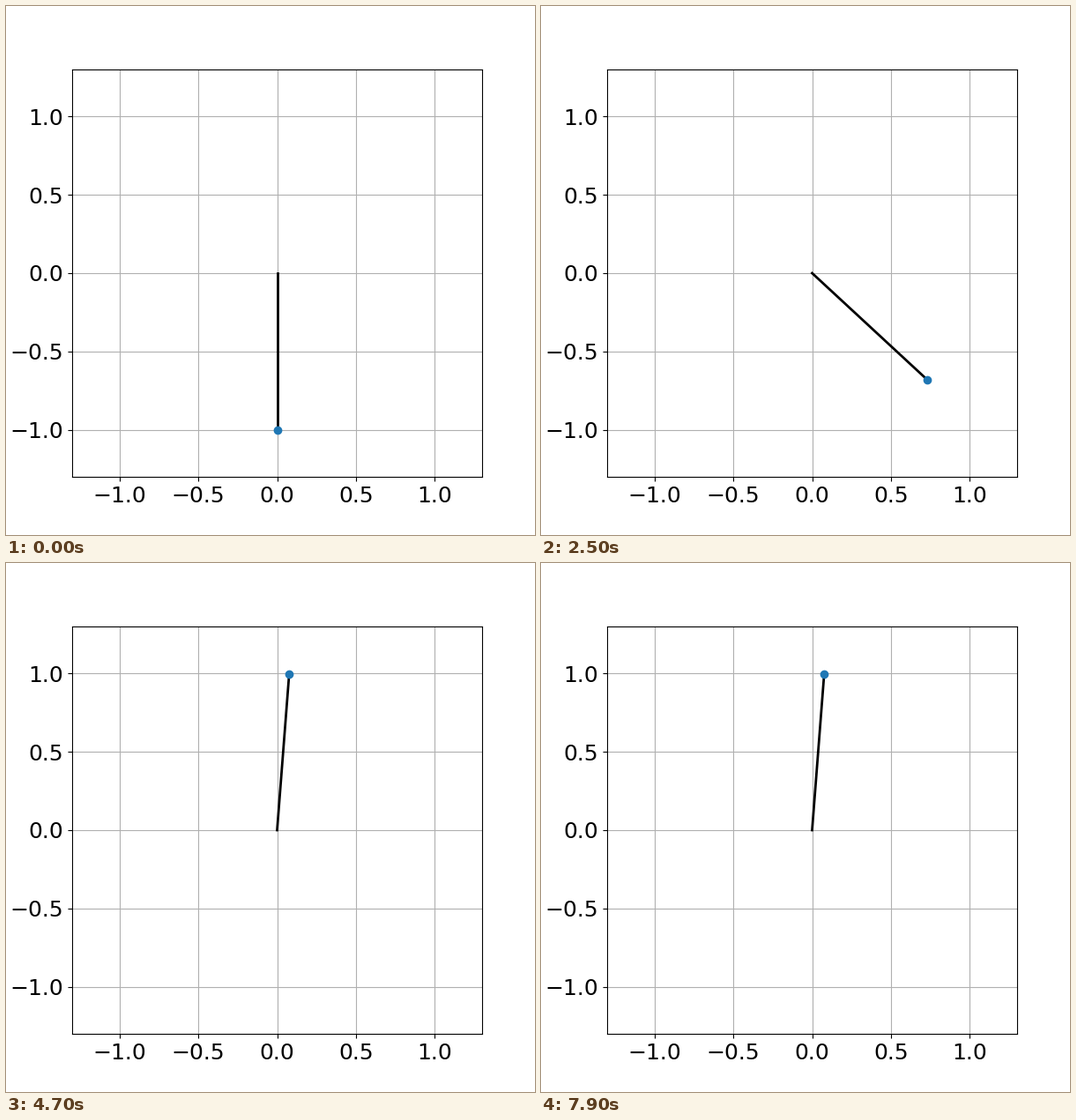
A matplotlib script that plays this animation: 600x600 px, repeating every 8000 ms.

```python
import numpy as np
import matplotlib.pyplot as plt
from matplotlib.animation import FuncAnimation

FRAMES, STEP = 80, 100  # 8 s loop
REST = 3.065            # angle held near upright, rad from straight down


def swing(t, t0, t1, a, b, skew=1.0):
    """Ease between two turning points; skew > 1 slows the arrival."""
    s = (t - t0) / (t1 - t0)
    q = 1 - (1 - s) ** skew
    return a + (b - a) * np.sin(np.pi / 2 * q) ** 2


def angle(t):
    right, left, top = 0.603, 1.777, 3.703
    if t < right:
        return swing(t, 0, right, 0, 0.73)
    if t < left:
        return swing(t, right, left, 0.73, -1.515)
    if t < top:
        return swing(t, left, top, -1.515, REST, 1.5)
    # balanced, with a slow wobble
    return REST + 0.075 * np.sin(np.pi * max(0, t - 4.7) / 3.2) ** 2


plt.rcParams.update({"font.family": "DejaVu Sans", "font.size": 18})
fig = plt.figure(figsize=(6, 6), dpi=100, facecolor="white")
ax = fig.add_axes([0.125, 0.11, 0.775, 0.77])
ticks = np.arange(-2, 3) / 2
ax.set(xlim=(-1.3, 1.3), ylim=(-1.3, 1.3), xticks=ticks, yticks=ticks)
ax.grid(True)

rod, = ax.plot([], [], color="black", lw=2)
bob, = ax.plot([], [], "o", color="#1f77b4", ms=6)


def draw(n):
    a = angle(n * STEP / 1000)
    x, y = np.sin(a), -np.cos(a)
    rod.set_data([0, x], [0, y])
    bob.set_data([x], [y])
    return rod, bob


anim = FuncAnimation(fig, draw, frames=FRAMES, interval=STEP,
                     repeat=True, repeat_delay=0)
plt.show()
```
